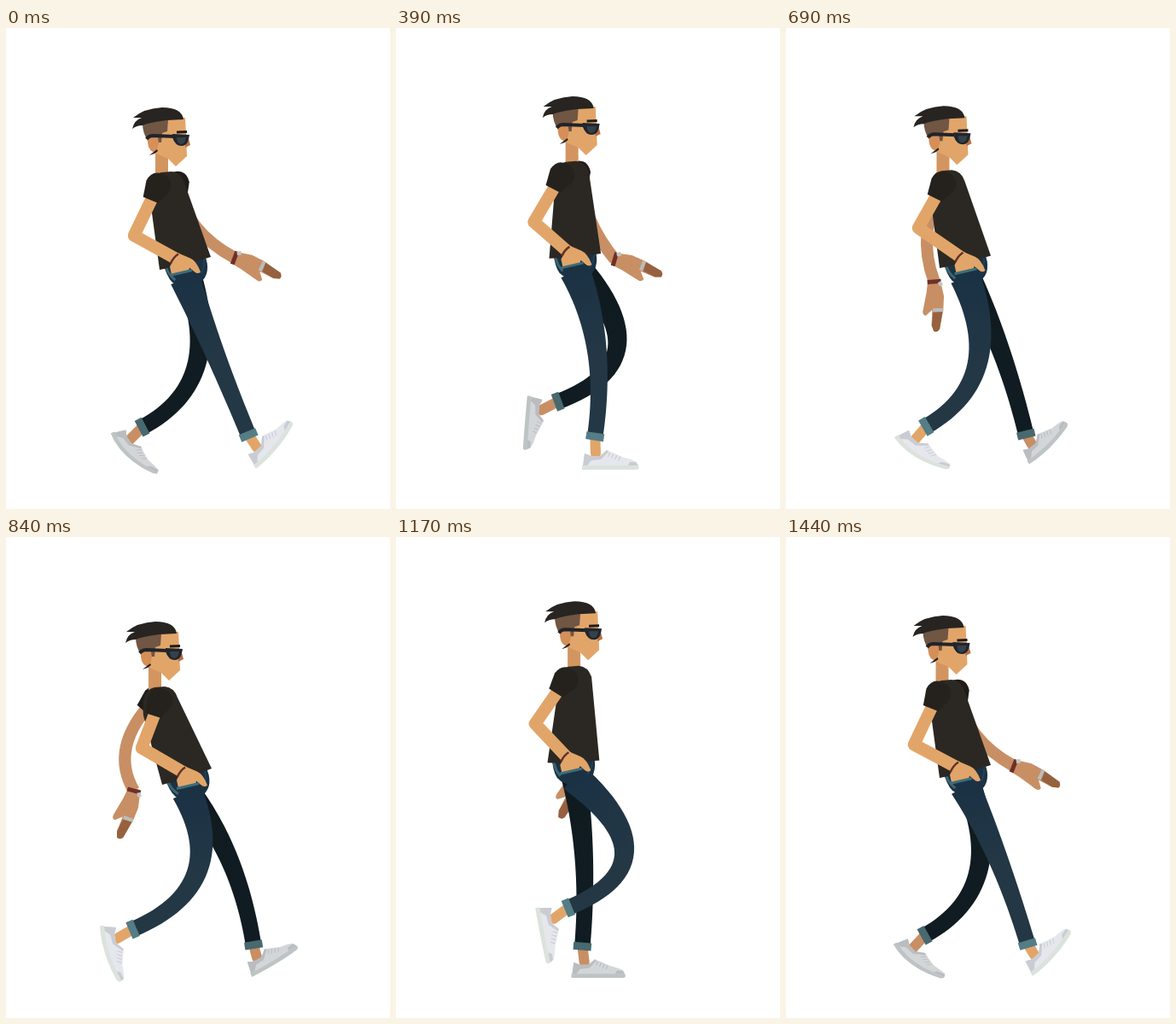
An HTML page with a canvas for the animation above (1.47 s loop, 450 by 563 pixels).

```html
<!DOCTYPE html>
<html lang="en">
<head>
<meta charset="utf-8">
<title>Walk cycle</title>
<style>
html, body { margin: 0; width: 100%; height: 100%; overflow: hidden; background: #fff; }
canvas { display: block; width: 450px; height: 563px; }
</style>
</head>
<body>
<canvas id="stage"></canvas>
<script>
const LOOP = 1470, STEP = 30;
const canvas = document.getElementById('stage');
const ctx = canvas.getContext('2d');
const dpr = window.devicePixelRatio || 1;
canvas.width = 450 * dpr;
canvas.height = 563 * dpr;

// time, knee x y, cuff x y, ankle x y, foot angle, toe bend
const LEG = [
  [0, 245, 381, 284, 476, 294, 491, -38, 14],
  [105, 262, 378, 290, 477, 294, 492, -26, 6],
  [240, 269, 370, 282, 478, 281, 498, 0, 0],
  [315, 256, 374, 258, 477, 257, 498, 0, 0],
  [548, 198, 382, 187, 478, 189, 498, 0, 0],
  [705, 224, 396, 163, 466, 149, 481, 60, 30],
  [735, 222, 398, 160, 467, 145, 482, 69, 32],
  [840, 223, 394, 149, 459, 130, 470, 86, 16],
  [975, 228, 400, 150, 455, 127, 462, 108, 8],
  [1050, 243, 388, 170, 445, 148, 452, 109, 2],
  [1282, 277, 361, 234, 437, 224, 455, 36, 7],
  [1440, 249, 378, 283, 476, 291, 489, -36, 14]
];
// time, head shift x y, collar x y, hem left x y, hem right x y
const BODY = [
  [0, 0, 0, 190, 168, 180, 283, 240, 268],
  [105, -8, 6, 182, 175, 183, 290, 241, 271],
  [240, -3, 9, 188, 178, 186, 294, 245, 275],
  [315, 14, -3, 199, 166, 183, 281, 243, 269],
  [540, 23.5, -18, 209.5, 150, 178, 262.3, 239, 259.7],
  [555, 22.3, -16.4, 208.3, 151.6, 179, 263.7, 240, 260],
  [705, .5, -1, 190, 167, 180, 282, 240, 267]
];
// time, shoulder x, elbow x y (from the collar), wrist x (from the hem)
const NEAR_ARM = [
  [0, -12, -40, 75, -10],
  [240, -12, -38, 78, -10],
  [540, -13, -50, 65, -6],
  [840, -2, -23, 72, -4],
  [1050, -10, -38, 71, -6],
  [1290, -12, -51, 67, -9],
  [1440, -12, -40, 76, -10]
];
// time, shoulder x, elbow x y, wrist x y (from the collar), hand angle
const FAR_ARM = [
  [0, 10, 32, 64, 78, 101, 20],
  [240, 10, 32, 62, 80, 94, -14],
  [540, 0, 0, 75, 12, 136, 59],
  [840, -8, -41, 70, -32, 122, 105],
  [1050, -5, -23, 79, -13, 130, 120],
  [1290, 5, 8, 70, 30, 114, 83],
  [1440, 10, 32, 64, 77, 101, 21]
];

const NEAR = { skin: '#e2a569', jeans: '#233745', top: '#1b3245', cuff: '#547d86',
  shoe: '#e5e7ed', sole: '#dbe3dc', trim: '#c9ccd2', hip: 36, size: 1 };
const FAR = { skin: '#c88f64', jeans: '#101c21', top: '#0f1a1e', cuff: '#48696f',
  shoe: '#d3d6d9', sole: '#bec3c3', trim: '#b9bdc0', hip: 30, size: .95 };

// Periodic smooth interpolation; flat stretches stay flat.
function sample(keys, time, period) {
  const n = keys.length, t = time % period;
  let i = n - 1;
  while (keys[i][0] > t) i--;
  const key = k => keys[(k + n) % n];
  const at = k => key(k)[0] + Math.floor(k / n) * period;
  const h = at(i + 1) - at(i), u = (t - at(i)) / h;
  const slope = (k, c) => (key(k + 1)[c] - key(k)[c]) / (at(k + 1) - at(k));
  const tangent = (k, c) => {
    const a = slope(k - 1, c), b = slope(k, c);
    const ha = at(k) - at(k - 1), hb = at(k + 1) - at(k);
    return a && b ? (a * hb + b * ha) / (ha + hb) : 0;
  };
  return key(i).slice(1).map((p, j) => {
    const c = j + 1, q = key(i + 1)[c], d = q - p;
    const m0 = tangent(i, c) * h, m1 = tangent(i + 1, c) * h;
    return p + u * (m0 + u * (3 * d - 2 * m0 - m1 + u * (m0 + m1 - 2 * d)));
  });
}

function fill(path, color) {
  ctx.fillStyle = color;
  ctx.fill(typeof path === 'string' ? new Path2D(path) : path);
}

function stroke(path, color, width, cap = 'butt') {
  ctx.strokeStyle = color;
  ctx.lineWidth = width;
  ctx.lineCap = cap;
  ctx.lineJoin = 'round';
  ctx.stroke(new Path2D(path));
}

function poly(points, color) {
  const p = new Path2D();
  points.forEach(([x, y]) => p.lineTo(x, y));
  p.closePath();
  fill(p, color);
}

function place(x, y, angle, draw, scale = 1) {
  ctx.save();
  ctx.translate(x, y);
  ctx.rotate(angle);
  ctx.scale(scale, scale);
  draw();
  ctx.restore();
}

const rad = deg => deg * Math.PI / 180;
const control = (a, m, b) => 2 * m - (a + b) / 2;

function shoe(c, bend) {
  const flex = pts => pts.map(([x, y]) => {
    const u = (x + 16) / 66;
    return [x, y - bend * u * u];
  });
  poly(flex([[-15, 15], [-14, 6], [-13, 0], [-5, 3], [5, 3], [13, -4], [20, -1],
    [31, 4], [42, 7], [48, 10], [50, 15], [34, 15], [18, 15], [2, 15]]), c.shoe);
  poly(flex([[-13, 0], [-5, 3], [5, 3], [13, -4], [15, -2], [6, 7], [-5, 8], [-10, 14], [-15, 14]]), c.trim);
  for (let x = 16; x < 30; x += 4) {
    const y = (x - 16) * .4;
    poly(flex([[x, y - 1], [x + 1.5, y - 1], [x - 1, y + 4], [x - 2, y + 4]]), c.trim);
  }
  poly(flex([[38, 14], [40, 10], [47, 10], [50, 14]]), c.trim);
  poly(flex([[-16, 14], [-5, 14], [6, 14], [17, 14], [28, 14], [39, 14], [50, 14], [51, 17],
    [49, 19], [38, 19], [27, 19], [16, 19], [5, 19], [-6, 19], [-16, 19]]), c.sole);
}

function leg(time, hx, hy, c) {
  const [mx, my, cx, cy, ax, ay, angle, bend] = sample(LEG, time, LOOP);
  const qx = control(hx, mx, cx), qy = control(hy, my, cy);

  stroke(`M${cx} ${cy}L${ax} ${ay}`, c.skin, 12, 'round');
  place(ax, ay, rad(angle), () => shoe(c, bend), c.size);

  const left = [], right = [];
  for (let i = 0; i <= 30; i++) {
    const t = i / 30, s = 1 - t;
    const x = s * s * hx + 2 * s * t * qx + t * t * cx;
    const y = s * s * hy + 2 * s * t * qy + t * t * cy;
    const dx = s * (qx - hx) + t * (cx - qx), dy = s * (qy - hy) + t * (cy - qy);
    const w = (18.5 + (c.hip - 18.5) * s * s) / 2 / Math.hypot(dx, dy);
    left.push([x - dy * w, y + dx * w]);
    right.unshift([x + dy * w, y - dx * w]);
  }
  const shade = ctx.createLinearGradient(hx, hy, mx, my);
  shade.addColorStop(0, c.top);
  shade.addColorStop(1, c.jeans);
  poly(left.concat(right), shade);
  place(cx, cy, Math.atan2(cy - qy, cx - qx), () => fill('M-4 -10.5H5V10.5H-4Z', c.cuff));
}

function sleeve(x, y, ex, ey, color) {
  place(x, y, Math.atan2(ey - y, ex - x), () =>
    fill('M0 -15Q-15 -14 -15 0Q-15 14 0 15L19 10L18 -9Z', color));
}

function farArm(time, tx, ty) {
  const [s, mx, my, wx, wy, angle] = sample(FAR_ARM, time, LOOP);
  ctx.save();
  ctx.translate(tx, ty);
  const qx = control(s, mx, wx), qy = control(15, my, wy);
  stroke(`M${s} 15Q${qx} ${qy} ${wx} ${wy}`, FAR.skin, 14);
  place(wx, wy, rad(angle), () => {
    fill('M-3 -7L18 -10L34 -8L56 -2Q60 1 58 5L50 7L33 5L39 13Q38 18 30 15L12 10L-3 7Z', FAR.skin);
    fill('M36 -7L56 -2Q60 1 58 5L51 7L36 4Z', '#96613f');
    stroke('M34 -8L33 4', '#b9bcbd', 4);
    stroke('M0 -8L0 8', '#6f2f29', 5);
    stroke('M2 -9L4 -5', '#c3c5c4', 5);
  });
  sleeve(s, 15, qx, qy, '#1f1c19');
  ctx.restore();
}

function head(x, y) {
  place(x, y, 0, () => {
    fill('M175 138H190V174H175Z', '#d39560');
    fill('M178 106L210 105L211 124L212 150L199 162L190 153L176 147Z', NEAR.skin);
    fill('M210 124L213 126L216 137L210 140Z', '#b86f45');
    fill('M160 112L190 107L189 121L183 123L182 134H178L166 132Q160 122 160 112Z', '#705643');
    fill('M178 128Q166 122 166 134Q167 145 176 146L179 135Z', '#d68f58');
    fill('M168 149L177 142L178 144L174 147Z', '#26211f');
    fill('M148 118Q150 108 159 105L149 105Q162 94 183 93Q206 93 208 107L188 108Q166 111 160 114Q153 114 148 118Z', '#272421');
    stroke('M165 130Q167 126 173 126L198 127', '#20242a', 4);
    fill('M195 124L215 125L214 130Q212 138 206 138Q198 138 195 128Z', '#20262d');
    fill('M200 128L211 128Q210 136 205 136Q200 135 200 128Z', '#34414b');
    stroke('M200 122L212 121.5', '#211c19', 3);
  });
}

function pelvis(x, y, tilt) {
  place(x, y, tilt, () => {
    fill('M-25 -8H25V6Q23 26 3 28Q-12 28 -20 18Q-25 10 -25 -8Z', NEAR.top);
    stroke('M-23 -1Q-22 9 -16 16', '#3c6672', 3);
    stroke('M23 -4Q22 10 15 16', '#294a5c', 1);
  });
}

function shirt(tx, ty, lx, ly, rx, ry) {
  fill(`M${lx} ${ly}L${tx - 21} ${ty + 34}Q${tx - 24} ${ty + 4} ${tx - 8} ${ty + 1}
    L${tx + 4} ${ty}Q${tx + 15} ${ty + 1} ${tx + 19} ${ty + 13}L${rx} ${ry}
    Q${(lx + rx) / 2} ${(ly + ry) / 2 + 2} ${lx} ${ly}Z`, '#2b2823');
}

function nearArm(time, tx, ty, bx, by) {
  const [s, ex, ey, w] = sample(NEAR_ARM, time, LOOP);
  const sx = tx + s, sy = ty + 17, wx = bx + w, wy = by - 5;
  stroke(`M${sx} ${sy}L${tx + ex} ${ty + ey}L${wx} ${wy}`, NEAR.skin, 14.5);
  place(wx, wy, 0, () => {
    fill('M-6 5L2 -7L16 -1Q23 2 28 15Q25 18 21 15L15 10L14 14L-6 18L-8 9Z', NEAR.skin);
    stroke('M-8 19L18 13', '#3f6d78', 3);
    stroke('M-7 5Q-4 -2 2 -6', '#61332a', 2.5);
  });
  sleeve(sx, sy, tx + ex, ty + ey, '#25221e');
}

function draw(time) {
  ctx.setTransform(dpr, 0, 0, dpr, 0, 0);
  ctx.fillStyle = '#fff';
  ctx.fillRect(0, 0, 450, 563);
  const [hx, hy, tx, ty, lx, ly, rx, ry] = sample(BODY, time, LOOP / 2);
  const bx = (lx + rx) / 2, by = (ly + ry) / 2;
  const sway = 4 + 4 * Math.sin(2 * Math.PI * time / LOOP + .3);

  farArm(time, tx, ty);
  leg(time + LOOP / 2, bx + sway, by + 18, FAR);
  leg(time, bx, by + 18, NEAR);
  pelvis(bx, by, Math.atan2(ry - ly, rx - lx));
  head(hx, hy);
  shirt(tx, ty, lx, ly, rx, ry);
  nearArm(time, tx, ty, bx, by);
}

function frame() {
  draw(Math.floor(performance.now() % LOOP / STEP) * STEP);
  requestAnimationFrame(frame);
}
frame();
</script>
</body>
</html>
```
